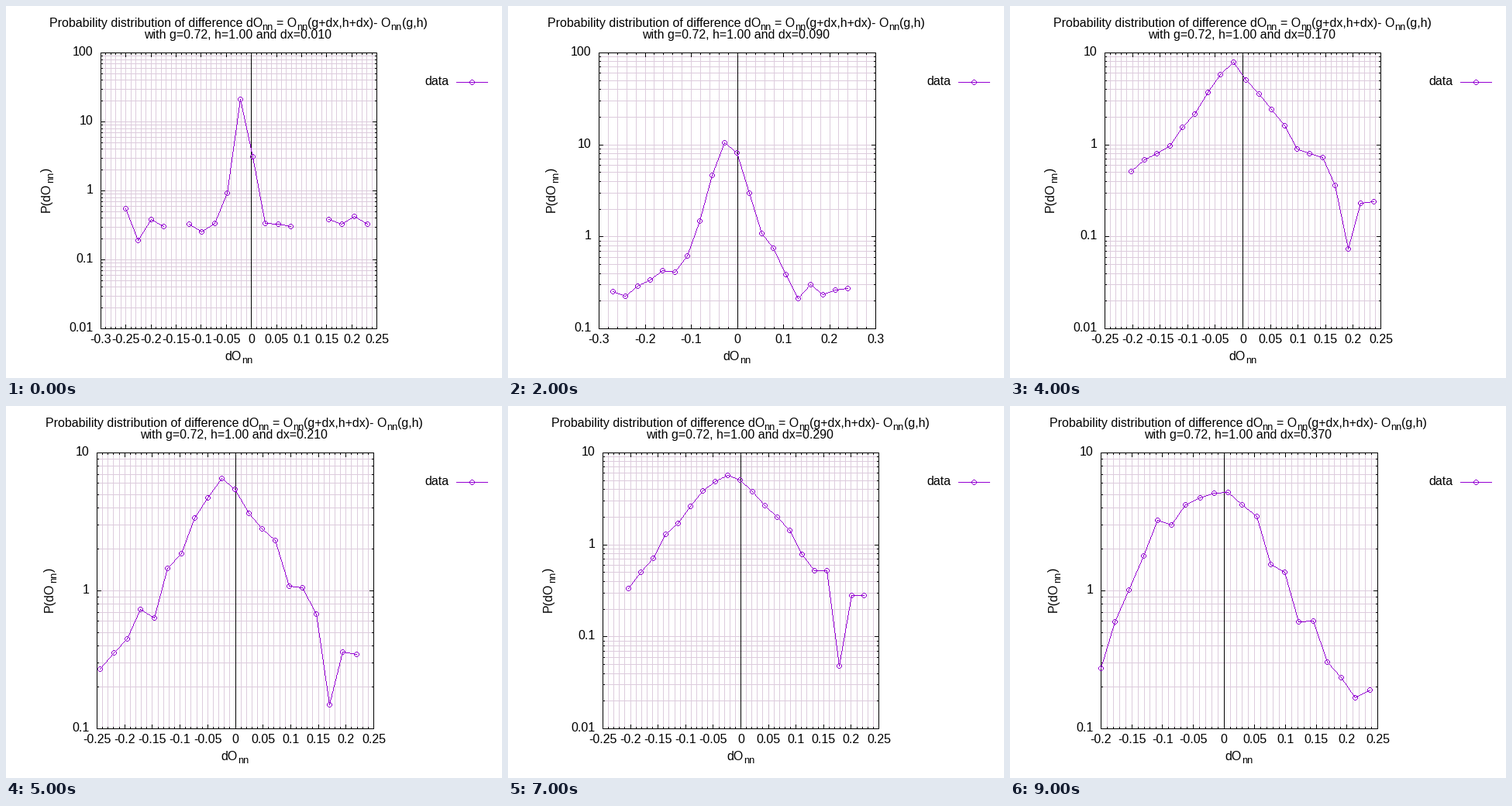
A matplotlib script that plays this animation: 640 by 480 pixels, repeating every 10000 ms.

```python
import numpy as np
import matplotlib.pyplot as plt
from matplotlib.animation import FuncAnimation

W, H, DPI = 640, 480, 100
TOP, BOTTOM = 60, 416
BINS = 20
BLACK, PURPLE, GRID = (0, 0, 0), (148, 0, 211), (221, 204, 221)
plt.rcParams["font.family"] = "Liberation Sans"

# first bin, last bin and lowest decade of each plot
PLOTS = [(-0.2505, 0.231, -2), (-0.266, 0.245, -1), (-0.270, 0.240, -1),
         (-0.239, 0.236, -1), (-0.202, 0.237, -2), (-0.244, 0.219, -1),
         (-0.225, 0.215, -1), (-0.203, 0.223, -2), (-0.233, 0.233, -1),
         (-0.200, 0.237, -1)]
EMPTY = [4, 14, 15]  # bins without samples at the smallest dx

fig = plt.figure(figsize=(W / DPI, H / DPI), dpi=DPI, facecolor="white")
ax = fig.add_axes([0, 0, 1, 1])


def pix(v):
    return int(np.floor(v + 0.5))


def density(k, dx, x, low):
    """log10 of a peak that widens with dx, on a noisy floor."""
    rng = np.random.default_rng(k + 3)
    dist = np.abs(x + 0.019)
    peak = 4.5 + 18.5 * np.exp(-dx / 0.1)
    width = 0.013 + 0.235 * dx
    power = 1 + ((dx - 0.18) / 0.17) ** 2
    floor = 0.35 - 0.5 * dx
    p = np.log10(peak * np.exp(-(dist / width) ** power) + floor)
    p += 0.1 * np.minimum(dist / 0.12, 1) * rng.normal(size=BINS)
    if k == 0:
        p[EMPTY] = np.nan
    elif 4 <= k <= 7:
        p[17] -= 0.7
    return np.maximum(p, low + 0.06), int(np.ceil(np.log10(peak)))


class Plot:
    """Autoscaled axes and data of one picture."""

    def __init__(self, k):
        first, last, self.low = PLOTS[k]
        self.dx = 0.01 + 0.04 * k
        self.x = np.linspace(first, last, BINS)
        self.p, self.high = density(k, self.dx, self.x, self.low)
        self.step = 0.1 if last - first > 0.5 else 0.05
        self.lo = np.floor(first / self.step) * self.step
        self.hi = np.ceil(last / self.step) * self.step
        self.left, self.right = (122, 478) if self.low == -2 else (117, 474)

    def col(self, v):
        return self.left + (v - self.lo) / (self.hi - self.lo) * (self.right - self.left)

    def row(self, v):
        return BOTTOM - (v - self.low) / (self.high - self.low) * (BOTTOM - TOP)


def vline(img, x, y0, y1, color=BLACK):
    img[y0:y1 + 1, x] = color


def hline(img, y, x0, x1, color=BLACK):
    img[y, x0:x1 + 1] = color


def segment(img, x0, y0, x1, y1):
    n = max(abs(x1 - x0), abs(y1 - y0)) + 1
    cols = np.rint(np.linspace(x0, x1, n)).astype(int)
    rows = np.rint(np.linspace(y0, y1, n)).astype(int)
    img[rows, cols] = PURPLE


def marker(img, x, y):
    dy, dx = np.mgrid[-3:4, -3:4]
    r = np.hypot(dx, dy)
    ring = (np.abs(r - 3) < 0.5) | (r == 0)
    img[y - 3:y + 4, x - 3:x + 4][ring] = PURPLE


def curve(img, points):
    for a, b in zip(points, points[1:]):
        if a and b:
            segment(img, *a, *b)
    for a in points:
        if a:
            marker(img, *a)


def write(x, y, s, size=16, ha="left", rot=0):
    ax.text(x, y, s, size=size * 72 / DPI, ha=ha, va="baseline",
            rotation=rot, rotation_mode="anchor", color="black")


def sub(x, y, rot=0):
    write(x, y, "nn", 12.8, rot=rot)


def titles(left, dx):
    x = left - 66.2
    write(x, 27, "Probability distribution of difference dO")
    sub(x + 274.6, 31)
    write(x + 293, 27, "= O")
    sub(x + 319.2, 31)
    write(x + 333.2, 27, "(g+dx,h+dx)- O")
    sub(x + 440.7, 31)
    write(x + 454.7, 27, "(g,h)")
    write(left + 55.7, 42, f"with g=0.72, h=1.00 and dx={dx:.3f}")

    write(left + 160.5, 457, "dO")
    sub(left + 182, 461)
    base = 57 if left == 122 else 61
    write(base, 265.6, "P(dO", rot=90)
    sub(base + 4, 228.3, rot=90)
    write(base, 214, ")", rot=90)


def x_axis(img, plot):
    minor = plot.step / 5
    for i in range(round(plot.lo / minor), round(plot.hi / minor) + 1):
        x = plot.col(i * minor)
        size = 2 if i % 5 else 5
        vline(img, pix(x), TOP, BOTTOM, GRID)
        vline(img, pix(x), TOP, TOP + size)
        vline(img, pix(x), BOTTOM - size, BOTTOM)
        if i % 5 == 0:
            write(x + 0.4, 435, f"{round(i * minor, 2):g}", ha="center")


def y_axis(img, plot):
    left, right = plot.left, plot.right
    for d in range(plot.low, plot.high + 1):
        for m in range(1, 10 if d < plot.high else 2):
            y = pix(plot.row(d + np.log10(m)))
            size = 5 if m == 1 else 2
            hline(img, y, left + 3, right - 3, GRID)
            hline(img, y, left, left + size)
            hline(img, y, right - size, right)
        write(left - 9.5, pix(plot.row(d)) + 4.4, f"{10.0 ** d:g}", ha="right")


def draw(k):
    ax.clear()
    ax.axis("off")
    plot = Plot(k)
    img = np.full((H, W, 3), 255, np.uint8)

    y_axis(img, plot)
    x_axis(img, plot)
    for x in (plot.left, plot.right, pix(plot.col(0))):
        vline(img, x, TOP, BOTTOM)
    for y in (TOP, BOTTOM):
        hline(img, y, plot.left, plot.right)
    curve(img, [None if np.isnan(p) else (pix(plot.col(x)), pix(plot.row(p)))
                for x, p in zip(plot.x, plot.p)])

    hline(img, 98, 581, 621, PURPLE)
    marker(img, 601, 98)
    write(571.2, 102, "data", ha="right")
    titles(plot.left, plot.dx)

    ax.imshow(img, extent=(0, W, H, 0), aspect="auto", interpolation="nearest")
    ax.set(xlim=(0, W), ylim=(H, 0))
    return []


anim = FuncAnimation(fig, draw, frames=len(PLOTS), interval=1000, repeat=True,
                     repeat_delay=0, init_func=lambda: draw(0), blit=False)
plt.show()
```
